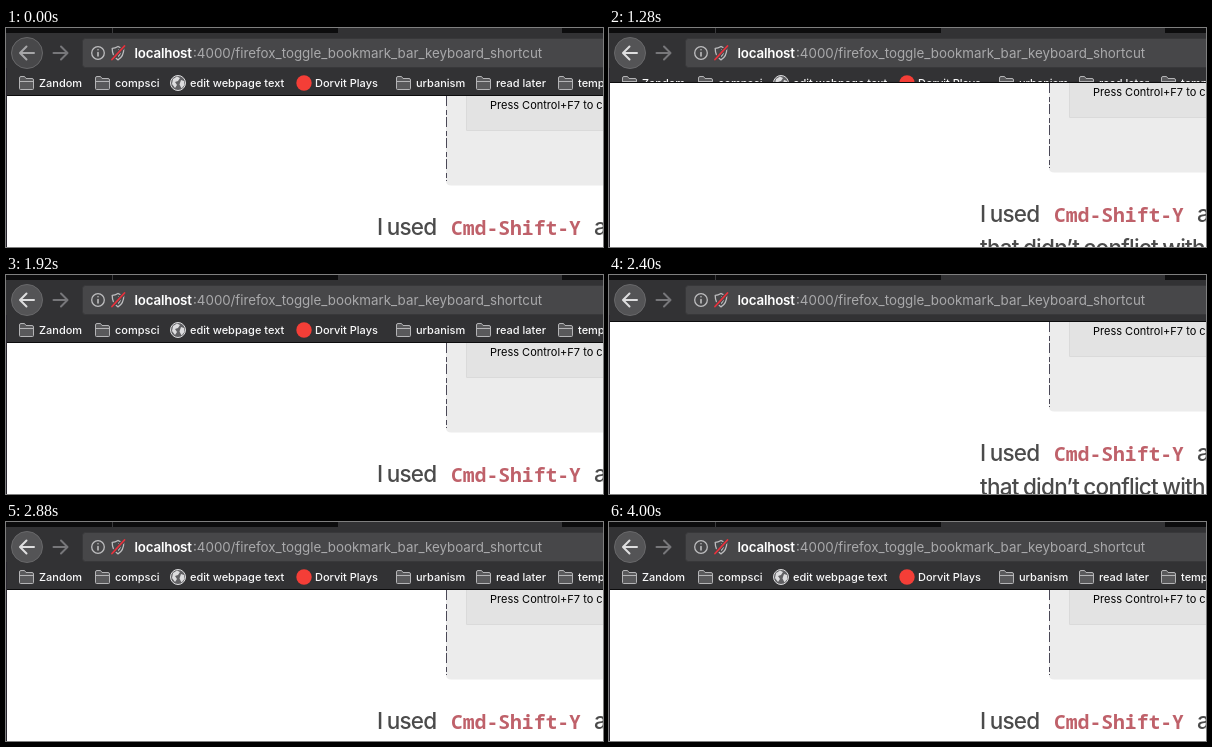
An HTML page that plays this animation: 597x219 px, repeating every 4480 ms.

```html
<!DOCTYPE html>
<html lang="en">
<head>
<meta charset="utf-8">
<title>Toggling the bookmark bar</title>
<style>
  html, body { margin: 0; width: 100%; height: 100%; overflow: hidden; background: #323234; }
  svg { display: block; width: 597px; height: 219px; }
  text { font-family: Inter, sans-serif; white-space: pre; }
  .url { font-size: 13.35px; fill: #a9a9ab; }
  .host { fill: #fff; font-weight: 600; letter-spacing: -.2px; }
  .bookmark { font-size: 11px; font-weight: 500; fill: #f9f9fa; }
  .prose { font-size: 22.5px; font-weight: 500; letter-spacing: -.75px; word-spacing: -1px; fill: #4b4b4b; }
  .code { font: 600 19.7px "Noto Sans Mono", monospace; fill: #bf616a; }
  .line { fill: none; stroke-linecap: round; stroke-linejoin: round; }
</style>
</head>
<body>
<svg viewBox="0 0 597 219">
  <defs>
    <path id="folder" d="M.5 12.5V2q0-1.500 1.500-1.500h3.500l1.500 2h6q1.500 0 1.500 1.500v8.500q0 1-1 1h-12q-1 0-1-1zM.5 5.500h14" fill="#59595b" stroke="#b4b4b6"/>
  </defs>
  <rect width="597" height="219" fill="#323234"/>

  <!-- tab strip -->
  <path d="M0 0h332v5h-332zM556 0h41v5h-41z" fill="#0c0c0d"/>
  <path d="M106.500 0v5" stroke="#3a3a3c"/>

  <!-- navigation bar -->
  <circle id="backDisc" cx="21" cy="25" r="15.500" stroke="#68686a"/>
  <path id="backArrow" class="line" d="M28 25H14.500M20.500 18.500L14 25l6.500 6.500" stroke-width="2"/>
  <path class="line" d="M47.500 25H61M55 18.500L61.500 25 55 31.500" stroke="#77777a" stroke-width="2"/>
  <rect x="76.500" y="10.500" width="540" height="29" rx="3" fill="#474749" stroke="#38383a"/>
  <g class="line" stroke="#bdbdbf" stroke-width="1.300">
    <circle cx="92" cy="25" r="6.300"/>
    <path d="M92 24.500v3.500M92 21.700v.1" stroke-width="1.600"/>
    <path d="M112 18.500q3 1.800 5.800 1.800 0 8.500-5.800 11.500-5.800-3-5.800-11.500 2.800 0 5.800-1.800z"/>
  </g>
  <path d="M112 21q1.700 1 3.400 1.300-.4 5-3.400 7z" fill="#bdbdbf"/>
  <path class="line" d="M106 31.500L118.500 18" stroke="#474749" stroke-width="4"/>
  <path class="line" d="M106 31.500L118.500 18" stroke="#e8313c" stroke-width="1.800"/>
  <text class="url host" x="128.500" y="30">localhost</text>
  <text class="url" x="187" y="30">:4000</text>
  <text class="url" x="224.500" y="30">/firefox_toggle_bookmark_bar_keyboard_shortcut</text>

  <g id="bookmarks">
    <circle cx="172" cy="55" r="7.500" fill="#606063" stroke="#dcdcde"/>
    <path d="M167 51l4-2.500 3 1.500-2 3-3 1 2 3-2 3-3-4zM175 52l3 1 .5 4-3 3.500-2-4z" fill="#dcdcde"/>
    <circle cx="298" cy="55" r="7.700" fill="#f43e37"/>
  </g>

  <g id="page">
    <rect y="67" width="597" height="1" fill="#0c0c0d"/>
    <rect x="1" y="68" width="596" height="200" fill="#fff"/>
    <path d="M440 68h157v89.500h-152q-5 0-5-5z" fill="#ececec"/>
    <path d="M440.500 68v85" stroke="#4a4856" stroke-dasharray="10 4 5 2"/>
    <path d="M460.500 68v34.500H597V68z" fill="#e3e3e3"/>
    <path d="M460.500 68v34.500H597" fill="none" stroke="#dadada"/>
    <text x="484" y="81" font-size="11" fill="#000">Press Control+F7 to change</text>
    <text class="prose" x="371" y="207">I used</text>
    <text class="code" x="445" y="207">Cmd-Shift-Y</text>
    <text class="prose" x="588" y="207">as</text>
    <text class="prose" x="371" y="241">that didn’t conflict with</text>
  </g>
  <path d="M.5 40v179" stroke="#29262f"/>
</svg>
<script>
  const LOOP = 4480;
  const FOCUS_TIME = 320;
  // [start in ms, pixels by which the bookmark bar is collapsed]
  const steps = [
    [0, 0], [1280, 13], [1440, 22], [1760, 3],
    [1920, 0], [2400, 21], [2560, 22], [2720, 10],
    [2880, 0], [3360, 18], [3520, 22], [3840, 5], [4000, 0]
  ];
  const folders = [
    [13, "Zandom"], [89, "compsci"], [390, "urbanism"],
    [470, "read later"], [552, "templates"]
  ];

  const byId = id => document.getElementById(id);
  const bookmarks = byId("bookmarks");
  const page = byId("page");
  const backDisc = byId("backDisc");
  const backArrow = byId("backArrow");

  function add(tag, attributes, label = "") {
    const node = document.createElementNS(bookmarks.namespaceURI, tag);
    for (const [name, value] of Object.entries(attributes)) node.setAttribute(name, value);
    node.textContent = label;
    bookmarks.append(node);
  }
  const addLabel = (x, label) => add("text", { class: "bookmark", x, y: 59 }, label);

  for (const [x, label] of folders) {
    add("use", { href: "#folder", x, y: 48 });
    addLabel(x + 20, label);
  }
  addLabel(184, "edit webpage text");
  addLabel(309, "Dorvit Plays");

  function draw(time) {
    const t = time % LOOP;
    const collapsed = steps.findLast(([start]) => t >= start)[1];
    const focused = t >= FOCUS_TIME;
    page.setAttribute("transform", `translate(0 ${-collapsed})`);
    backDisc.setAttribute("fill", focused ? "#545456" : "#48484a");
    backArrow.setAttribute("stroke", focused ? "#dededf" : "#a6a6a8");
  }

  function tick() {
    draw(performance.now());
    requestAnimationFrame(tick);
  }
  tick();
</script>
</body>
</html>
```
